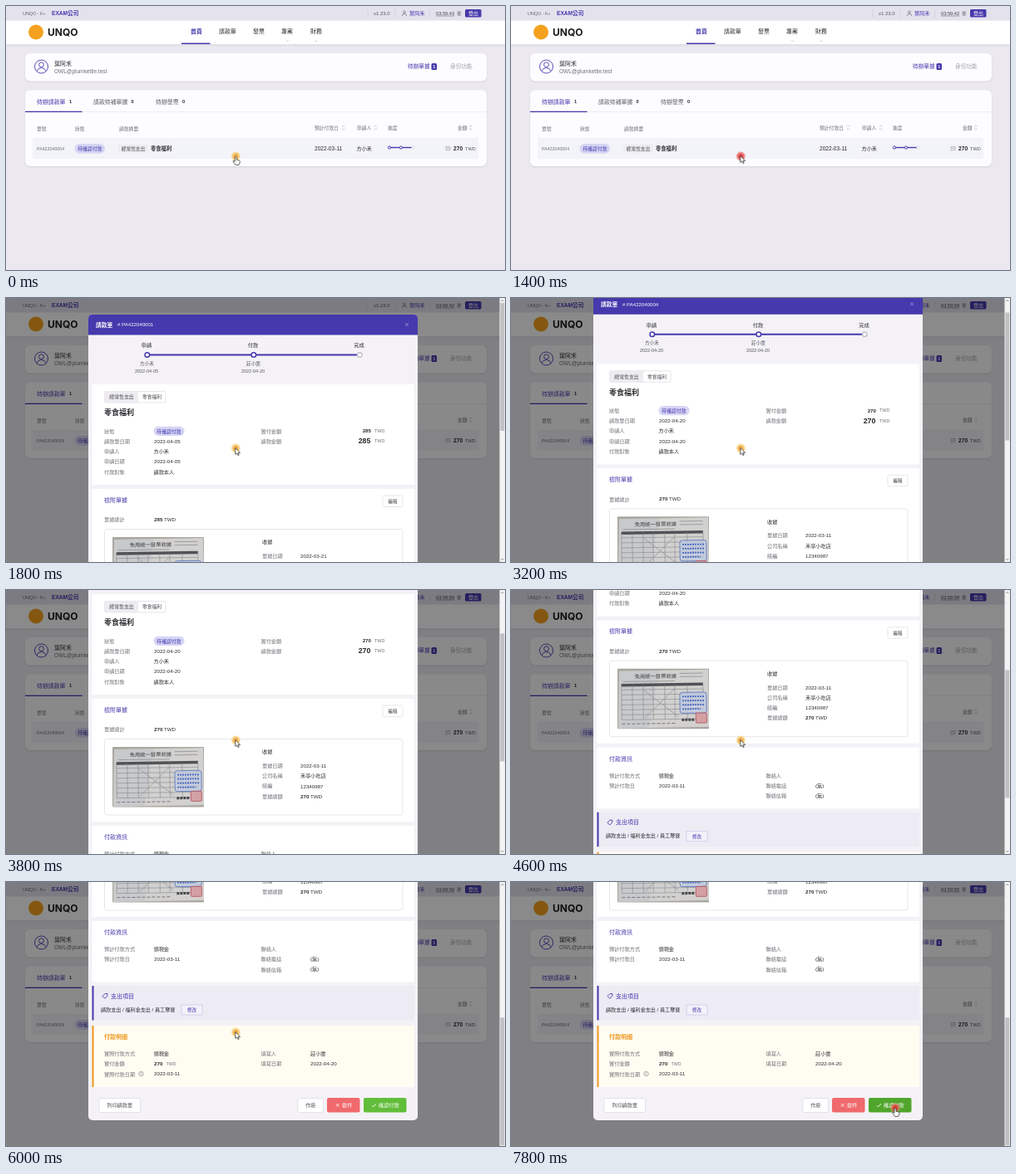
An HTML page that plays this animation: 600 px wide and 318 px high, repeating every 8000 ms.

```html
<!DOCTYPE html>
<html lang="en">
<head>
<meta charset="utf-8">
<title>Payment request</title>
<style>
html, body { margin: 0; width: 100%; height: 100%; overflow: hidden; background: #ebe9ef; }
svg { display: block; width: 100%; height: 100%; }
text { font-family: "Liberation Sans", "Noto Sans CJK TC", "Noto Sans CJK", sans-serif; white-space: pre; }
.brand { font-family: Inter, sans-serif; }
</style>
</head>
<body>
<svg id="stage" viewBox="0 0 600 318" xmlns="http://www.w3.org/2000/svg"></svg>
<script>
const PURPLE = '#4539ad', INK = '#2b2b30', GREY = '#707078', PALE = '#a2a2aa', ORANGE = '#f0961c';
const EDGE = '#dcdae2', BADGE = '#d6d5f4';

// y is the vertical centre of the line
const text = (x, y, size, fill, str, opt = '') =>
  `<text x="${x}" y="${(y + size * .37).toFixed(2)}" font-size="${size}" fill="${fill}" ${opt}>${str}</text>`;
const BOLD = 'font-weight="700"', MID = 'text-anchor="middle"', END = 'text-anchor="end"';
const rect = (x, y, x2, y2, fill, r = 0, opt = '') =>
  `<rect x="${x}" y="${y}" width="${x2 - x}" height="${y2 - y}" rx="${r}" fill="${fill}" ${opt}/>`;
const path = (d, stroke, width = .7, opt = '') =>
  `<path d="${d}" fill="none" stroke="${stroke}" stroke-width="${width}" ${opt}/>`;
const ring = (x, y, r, stroke, width = 1, fill = '#fff') =>
  `<circle cx="${x}" cy="${y}" r="${r}" fill="${fill}" stroke="${stroke}" stroke-width="${width}"/>`;
const outlined = (x, y, x2, y2, r = 1.5, color = EDGE) =>
  rect(x, y, x2, y2, '#fff', r, `stroke="${color}" stroke-width=".7"`);
const sortMark = (x, y) => path(`M${x - 1.5} ${y - 1}l1.5-1.6 1.5 1.6M${x - 1.5} ${y + 1}l1.5 1.6 1.5-1.6`, PALE, .6);
const chevron = x => path(`M${x - 1.2} 41.5l1.2 1.2 1.2-1.2`, PALE, .6);
const label = (x, y, str) => text(x, y, 6.2, GREY, str);
const value = (x, y, str, opt = '') => text(x, y, 6.2, INK, str, opt);
const slot = (key, x, y, size, opt = '', fill = INK) => text(x, y, size, fill, '', `data-slot="${key}" ${opt}`);

function topBar() {
  return rect(0, 0, 600, 18, '#e4e2ed') +
    text(20, 9, 5.4, '#66666e', 'UNQO - K+') +
    text(55, 9, 6.6, PURPLE, 'EXAM公司', BOLD) +
    path('M435 4v10M468 4v10M509.500 4v10', '#cdcad8', .6) +
    text(442, 9, 6, '#55555c', 'v1.23.0') +
    ring(479, 7.3, 1.4, GREY, .7, 'none') + path('M476.500 12q0-2.700 2.500-2.700t2.500 2.700', GREY) +
    text(485, 9, 6.2, PURPLE, '葉阿禾') +
    slot('clock', 517, 9, 5.7, '', '#44444a') + path('M517 12h22', '#55555c', .5) +
    text(542, 9, 5.5, GREY, '後') +
    rect(552, 4, 571.5, 13.5, PURPLE, 1.5) + text(562, 8.8, 6, '#fff', '登出', MID);
}

function navBar() {
  const items = [[222, '首頁'], [256, '請款單'], [297, '發票'], [331, '專案'], [366, '財務']];
  return rect(0, 45, 600, 48.5, '#dfdde5', 0, 'opacity=".7"') + rect(0, 17.5, 600, 46, '#fff') +
    '<circle cx="36" cy="31.500" r="9" fill="#f3a11e"/>' +
    text(50, 31.5, 12, '#1c1c20', 'UNQO', 'class="brand" font-weight="700"') +
    items.map(([x, s], i) => text(x, 30.7, 6.9, i ? INK : PURPLE, s, i ? '' : BOLD)).join('') +
    rect(211, 44.5, 245.5, 46, PURPLE) + chevron(338.5) + chevron(373);
}

function profileCard() {
  return rect(22.5, 57.5, 578.5, 92, '#dddbe3', 6) + rect(23, 57, 578, 90.5, '#fdfcfe', 6) +
    ring(42.5, 73, 8, PURPLE, .9) + ring(42.5, 70.7, 2.9, PURPLE, .9) +
    path('M37 78.500q1.200-4 5.500-4t5.500 4', PURPLE, .9) +
    text(58, 69, 7, INK, '葉阿禾') + text(58, 78.7, 6.5, GREY, 'OWL@plumkettle.test') +
    text(483, 72.8, 6.7, PURPLE, '待辦單據') +
    rect(511.5, 69, 518, 77, PURPLE, 1.5) + text(514.8, 73, 5.4, '#fff', '1', MID + ' ' + BOLD) +
    text(534, 72.8, 6.7, PALE, '身份功能');
}

function listCard() {
  const head = [[37, '單號'], [83, '狀態'], [136, '請款摘要'], [371, '預計付款日'], [422, '申請人'], [459, '進度'], [543, '金額']];
  const tabs = [[37, 76, '待辦請款單', 1], [105, 150.5, '請款待補單據', 0], [180, 212, '待辦發票', 0]];
  return rect(22.5, 102.5, 578.5, 194.5, '#dddbe3', 6) + rect(23, 101.5, 578, 193, '#fdfcfe', 6) +
    tabs.map(([x, nx, s, n]) => text(x, 115, 6.9, n ? PURPLE : '#5d5d64', s) + text(nx, 115.3, 5.6, INK, n, BOLD)).join('') +
    rect(23, 127, 578, 127.7, '#e9e7ee') + rect(23, 126.7, 91.5, 128, PURPLE) +
    head.map(([x, s]) => text(x, x < 200 ? 148 : 146.8, 5.8, GREY, s)).join('') +
    [405.5, 444.5, 559].map(x => sortMark(x, 146.5)).join('') +
    rect(32, 159.5, 568, 184, '#f3f3fa') + rect(32, 159.2, 568, 159.7, '#e9e8f0') +
    text(37, 171.7, 5.3, GREY, 'PA422040004') +
    rect(82.5, 166, 119, 177.7, BADGE, 6) + text(101, 171.8, 5.8, PURPLE, '待確認付款', MID) +
    rect(135, 166.5, 171, 177.5, '#eeedf0', 2) + text(153, 171.8, 5.7, '#4c4c52', '經常性支出', MID) +
    text(174, 171.7, 6.3, INK, '零食福利', BOLD) +
    text(371, 171.5, 6.6, INK, '2022-03-11') + text(421.5, 171.5, 6.2, INK, '方小禾') +
    path('M461 170.500h27', PURPLE, 1.4) + ring(461, 170.5, 1.6, PURPLE) + ring(475, 170.5, 1.6, PURPLE) +
    ring(489.5, 170.5, 1.6, '#d0ced8', .8) +
    path('M529 169.500h5v3.800h-3l-1 1v-1h-1zM530 171.300h3', PALE, .7) +
    text(538, 171.5, 6.7, INK, '270', BOLD) + text(552, 171.8, 5.6, '#55555c', 'TWD');
}

// Soft stand-in for a photographed paper receipt
function receipt() {
  const rows = [25, 31, 37, 43, 49, 55, 61].map(y => `M5 ${y}h98`).join('');
  const cols = [18, 31, 43, 57, 69, 84].map(x => `M${x} 19v42`).join('');
  return `<g transform="translate(128 288)">` +
    rect(0, 0, 110, 72.5, '#a9a69f', 1) +
    `<path d="M2 3L109 1L110 70L1 72z" fill="#d2d1cf"/><path d="M2 3L50 2L38 71L1 72z" fill="#bfc2c7" opacity=".5"/>` +
    `<g transform="rotate(-.8 55 36)">` + text(21, 9, 6.3, '#3c3d43', '免用統一發票收據') +
    path('M75 6h28M75 10h28M7 15h62', '#777981', .6) +
    rect(5, 17.5, 103, 21, '#3b3c42', 0, 'opacity=".85"') + path(rows + cols + 'M5 19v42M103 19v42', '#777981', .5) +
    path('M32 26L73 58M68 25L33 59', '#85868c', .6) +
    rect(75, 29, 107, 54, '#c3cbe0', 3, 'stroke="#4566bd" stroke-width=".9" opacity=".8"') +
    path('M78 34h26M78 39h26M78 44h26M78 49h22', '#4566bd', 1.8, 'stroke-dasharray="2 1"') +
    path('M5 66h66', '#777981', 1, 'stroke-dasharray="4 2"') +
    rect(94, 54, 107, 66, '#d3a0a4', 1, 'stroke="#b8505a" stroke-width=".8"') +
    path('M77 62h15', '#45464c', 3, 'stroke-dasharray="3 1"') + '</g></g>';
}

function stepper() {
  const steps = [[169.5, '申請', '方小禾'], [297.5, '付款', '莊小雲'], [425, '完成', '']];
  return path('M170 68.500H422', PURPLE, 1.8) + steps.map(([x, name, who], i) =>
    text(x - .5, 57, 6.2, INK, name, MID) +
    ring(x + .3, 68.5, 2.8, i < 2 ? PURPLE : '#c4c2cc', 1.5) + text(x, 79, 5.6, '#55555c', who, MID)).join('') +
    slot('asked', 169, 87.8, 5.5, MID, '#55555c') + text(297, 87.8, 5.5, '#55555c', '2022-04-20', MID);
}

function summary() {
  const names = ['狀態', '請款單日期', '申請人', '申請日期', '付款對象'];
  return rect(103.5, 104, 491, 225, '#fff') +
    outlined(118.5, 112.5, 192, 126) + rect(118.5, 112.5, 159, 126, '#eeecf1', 1.5) +
    text(139, 119.3, 5.9, '#4c4c52', '經常性支出', MID) + text(175.5, 119.3, 5.8, '#4c4c52', '零食福利', MID) +
    text(118, 138, 9, INK, '零食福利', BOLD) +
    names.map((s, i) => label(118, 160.3 + i * 12.3, s)).join('') +
    rect(177.5, 154.7, 214.5, 166, BADGE, 5.7) + text(196, 160.5, 5.9, PURPLE, '待確認付款', MID) +
    slot('asked', 178, 172.6, 6.2) + value(177.5, 184.7, '方小禾') +
    slot('asked', 178, 197, 6.2) + value(177.5, 209.3, '請款本人') +
    label(306.5, 160.3, '實付金額') + label(306.5, 172.6, '請款金額') +
    slot('sum', 439, 160, 6.2, END + ' ' + BOLD) + slot('sum', 438.5, 172.2, 8.9, END + ' ' + BOLD) +
    text(443, 160, 5.4, GREY, 'TWD') + text(443, 172.4, 5.4, GREY, 'TWD');
}

function documents() {
  const rows = ['單據日期', '公司名稱', '統編', '單據總額'];
  return rect(103.5, 230, 491, 378, '#fff') + text(118, 243, 7, PURPLE, '檢附單據') +
    outlined(453, 238, 477, 251.5) + text(465, 244.8, 5.5, '#4c4c52', '編輯', MID) +
    label(118, 267, '單據總計') + slot('sum', 178, 266.7, 6.2, BOLD) + value(190, 266.7, 'TWD') +
    outlined(118.5, 278.5, 477, 370, 3) + receipt() +
    value(308, 294, '收據') +
    rows.map((s, i) => label(308, 310.8 + i * 12.2, s)).join('') +
    slot('billed', 354, 310.8, 6.2) + value(354, 323, '禾亭小吃店') + value(354, 335.4, '12340987') +
    slot('sum', 354, 347.4, 6.2, BOLD) + value(366, 347.4, 'TWD');
}

function payment() {
  return rect(103.5, 383, 491, 456.5, '#fff') + text(118, 396.5, 7, PURPLE, '付款資訊') +
    label(118, 417, '預計付款方式') + value(177.5, 416.7, '領現金') +
    label(118, 429.2, '預計付款日') + value(178, 429, '2022-03-11') +
    label(306.5, 417, '聯絡人') + label(306.5, 429.2, '聯絡電話') + label(306.5, 441.4, '聯絡信箱') +
    value(366, 429, '(無)') + value(366, 441.2, '(無)') +
    rect(103.5, 461, 491, 502.5, '#edebf4') + rect(103.5, 461, 105.5, 502.5, PURPLE) +
    path('M116 473.500l3-3h2.800v2.800l-3 3z', PURPLE, .9) + text(126, 473, 7, PURPLE, '支出項目') +
    text(114, 489.5, 6.1, INK, '請款支出 / 福利金支出 / 員工聚餐') +
    rect(211, 484, 236, 496, '#f3f1fa', 0, 'stroke="#c9c4e8" stroke-width=".7"') + text(223.5, 490, 5.6, PURPLE, '修改', MID);
}

function details() {
  return rect(103.5, 509, 491, 583, '#fffdf2') + rect(103.5, 509, 105.5, 583, ORANGE) +
    text(118, 522.5, 7, ORANGE, '付款明細', BOLD) +
    label(118, 543, '實際付款方式') + value(177.5, 542.7, '領現金') +
    label(118, 555.2, '實付金額') + value(178, 555, '270', BOLD) + text(192.5, 555.2, 5.3, GREY, 'TWD') +
    label(118, 567.4, '實際付款日期') + ring(162.5, 567, 2.7, GREY, .6, 'none') + path('M162.500 565.300v2.300M162.500 568.100v.6', GREY, .6) +
    value(178, 567, '2022-03-11') +
    label(306.5, 543, '填寫人') + value(366, 542.7, '莊小雲') +
    label(306.5, 555.2, '填寫日期') + value(366, 555, '2022-04-20');
}

function actions() {
  return outlined(112, 596.5, 161.5, 613.5) + text(136.8, 605, 6.1, '#4c4c52', '列印請款單', MID) +
    outlined(351, 596.5, 381.5, 613.5) + text(366.3, 605, 6.1, '#4c4c52', '作廢', MID) +
    rect(386, 596, 425.5, 613.5, '#f0696d', 2) + path('M396.800 603l3.800 3.800m0-3.800l-3.800 3.800', '#fff', .8) +
    text(404, 605, 6.2, '#fff', '退件') +
    rect(430, 596, 481.5, 613.5, '#62bd3a', 2, 'id="confirm"') + path('M440 605l1.700 1.800 3.200-3.800', '#fff', .9) +
    text(448, 605, 6.2, '#fff', '確認付款');
}

function dialog() {
  return rect(99, 20, 495, 623, '#f4f2f6', 5) +
    `<path d="M99 44.500V25q0-5 5-5H490q5 0 5 5V44.500z" fill="${PURPLE}"/>` +
    text(108, 32, 6.8, '#fff', '請款單', BOLD) + slot('number', 134, 32, 6.1, '', '#fff') +
    path('M480 30l4 4m0-4l-4 4', '#aaa4de', .7) +
    stepper() + summary() + documents() + payment() + details() + actions();
}

function scrollBar() {
  return rect(593.5, 0, 600, 318, '#f3f3f4') + path('M595.300 4l1.500-1.600 1.500 1.600M595.300 314l1.500 1.600 1.500-1.600', '#77777c', .8) +
    rect(594.3, 6, 599.3, 160, '#c1c1c4', 0, 'id="thumb"');
}

function pointer() {
  return '<circle id="glow" r="6.200"/>' +
    '<path id="arrow" d="M-.5-.5v8l1.900-1.600 1.300 2.700 1.300-.6-1.300-2.600h2.600z" fill="#fff" stroke="#222" stroke-width=".7"/>' +
    '<path id="hand" d="M-1 1q1-1.500 2 0v3.200l3 .8q1.200.4 1 1.800l-.6 2.400-.7 1.200h-4l-2.900-4q-.2-1.300 1-1l1.200 1z" fill="#fff" stroke="#222" stroke-width=".7"/>';
}

const glow = (id, core, halo) => `<radialGradient id="${id}"><stop stop-color="${core}"/>` +
  `<stop offset=".4" stop-color="${core}" stop-opacity=".85"/><stop offset=".75" stop-color="${halo}" stop-opacity=".75"/>` +
  `<stop offset="1" stop-color="${halo}" stop-opacity="0"/></radialGradient>`;

const $ = id => document.getElementById(id);
$('stage').innerHTML = `<defs>${glow('warm', '#efa53a', '#f7d583')}${glow('hot', '#dc3430', '#ee8078')}</defs>` +
  rect(0, 0, 600, 318, '#ebe9ef') + topBar() + navBar() + profileCard() + listCard() +
  `<g id="modal">${rect(0, 0, 600, 318, '#000', 0, 'opacity=".46"')}<g id="sheet">${dialog()}</g>${scrollBar()}</g>` +
  `<g id="pointer">${pointer()}</g>`;

const LOOP = 8000, TICK = 200;
const DRAFT = { number: '# PA422040001', asked: '2022-04-05', sum: '285', billed: '2022-03-21' };
const LOADED = { number: '# PA422040004', asked: '2022-04-20', sum: '270', billed: '2022-03-11' };
const FADE = [[1400, 0], [1700, 1]];
const SCROLL = [[3000, 0], [3800, 99], [5200, 264], [5800, 336]];
const MOVE = [[6200, 0], [7200, 1]];
const slots = [...document.querySelectorAll('[data-slot]')];

function along(keys, t) {
  if (t <= keys[0][0]) return keys[0][1];
  for (let i = 1; i < keys.length; i++) {
    const [t0, v0] = keys[i - 1], [t1, v1] = keys[i];
    if (t < t1) return v0 + (v1 - v0) * (t - t0) / (t1 - t0);
  }
  return keys[keys.length - 1][1];
}

// The session countdown starts over on the first tick after the data arrives
function clock(t) {
  const s = Math.floor(t / 1000);
  return '03:59:' + ((s < 3 ? 43 : 62) - s);
}

function draw(t) {
  const data = { ...(t < 2200 ? DRAFT : LOADED), clock: clock(t) };
  for (const el of slots) el.textContent = data[el.dataset.slot];

  const scroll = along(SCROLL, t);
  $('modal').setAttribute('opacity', along(FADE, t));
  $('sheet').setAttribute('transform', `translate(0 ${-scroll})`);
  $('thumb').setAttribute('y', 6 + scroll * .468);

  const p = along(MOVE, t), ease = p * p * (3 - 2 * p);
  const over = p === 1, pointing = t < 1400 || over, press = t === 1400 || t === 7800;
  $('pointer').setAttribute('transform', `translate(${276.3 + 185.7 * ease} ${181 + 91 * ease})`);
  $('hand').setAttribute('visibility', pointing ? 'visible' : 'hidden');
  $('arrow').setAttribute('visibility', pointing ? 'hidden' : 'visible');
  $('glow').setAttribute('fill', press ? 'url(#hot)' : 'url(#warm)');
  $('confirm').setAttribute('fill', over ? '#50a62c' : '#62bd3a');
}

const start = performance.now();
let shown = -1;
function frame() {
  const t = Math.floor((performance.now() - start) % LOOP / TICK) * TICK;
  if (t !== shown) draw(shown = t);
  requestAnimationFrame(frame);
}
frame();
</script>
</body>
</html>
```
